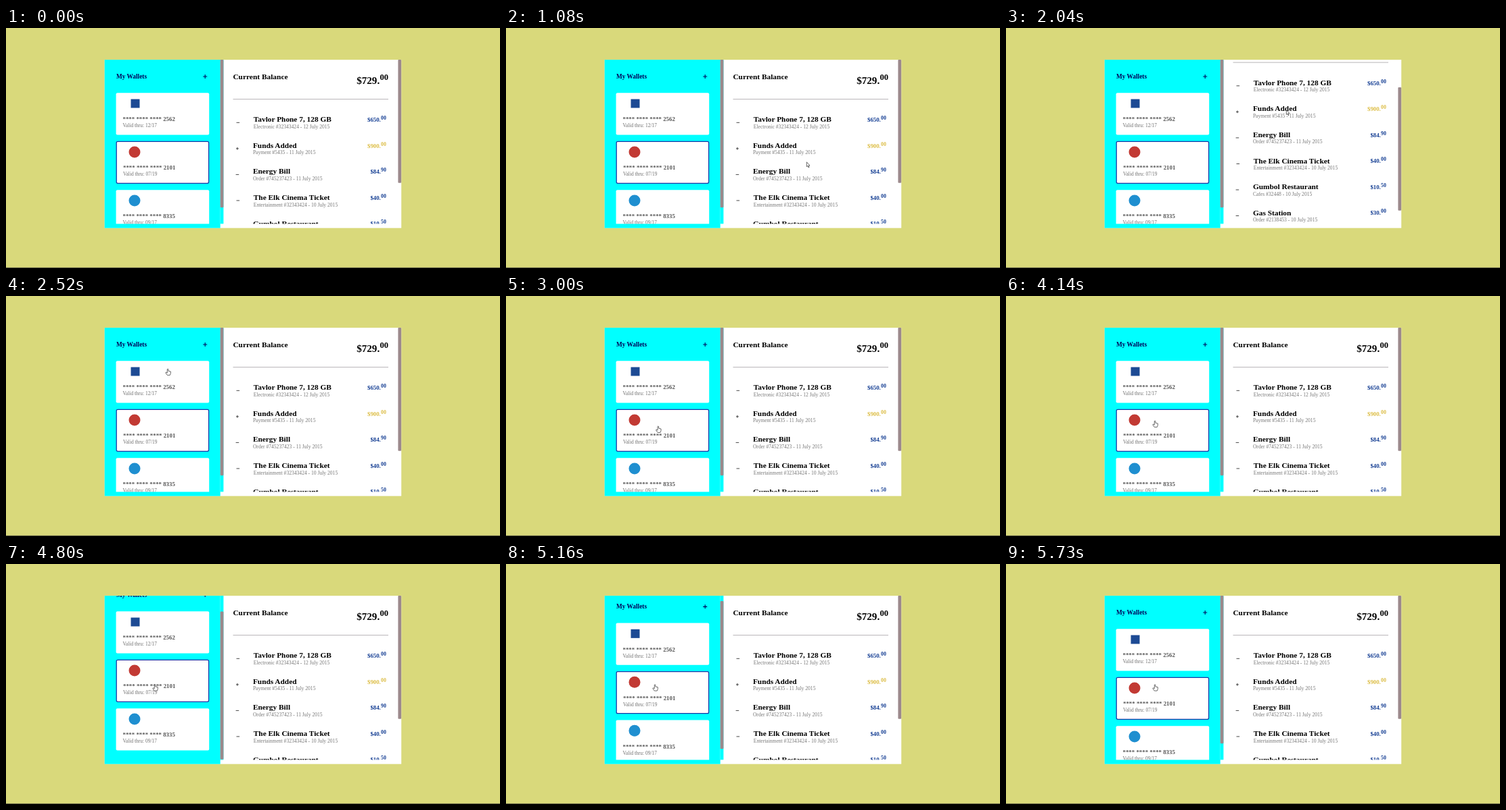
Recreate the animation shown at these times as an HTML page. Size 730 px wide and 356 px high, loop 5760 ms.

```html
<!DOCTYPE html>
<html lang="en">
<head>
<meta charset="utf-8">
<title>Wallet</title>
<style>
  html, body { margin: 0; width: 100%; height: 100%; overflow: hidden; background: #d9d97b; }
  svg { display: block; width: 100vw; height: 100vh; font-family: "Liberation Serif", "Times New Roman", serif; }
  .bold { font-weight: bold; }
  .end { text-anchor: end; }
</style>
</head>
<body>
<svg viewBox="0 0 730 356">
  <clipPath id="leftView"><rect x="145.7" y="47.1" width="171" height="243.3"/></clipPath>
  <clipPath id="rightView"><rect x="321.4" y="47.1" width="258" height="243.3"/></clipPath>
  <rect width="730" height="356" fill="#d9d97b"/>
  <rect y="355" width="730" height="1" fill="#74744e"/>
  <rect x="145.7" y="47.1" width="438.5" height="249.6" fill="#fff"/>
  <rect x="145.7" y="47.1" width="171" height="249.6" fill="#0ff"/>
  <rect x="316.7" y="47.1" width="4.7" height="243.3" fill="#0ff"/>
  <g clip-path="url(#leftView)"><g id="wallets"></g></g>
  <g clip-path="url(#rightView)"><g id="balance"></g></g>
  <rect id="leftThumb" x="316.7" y="47.1" width="4.7" height="219.2" rx="1" fill="#9c898c"/>
  <rect id="rightThumb" x="579.4" y="47.1" width="4.7" height="182.7" rx="1" fill="#9c898c"/>
  <g id="cursor" fill="#fff" stroke="#444" stroke-width=".8" stroke-linejoin="round">
    <path id="arrow" d="M0 0V7L1.6 5.6L2.7 8.2L3.8 7.7L2.7 5.2H4.7Z"/>
    <path id="hand" d="M0 .8Q.8 -.4 1.6 .8V3.4L5 4.2V7L4 9.6H0L-2.4 6.2Q-2.4 5 -1.2 5.4L0 6.4Z"/>
  </g>
</svg>
<script>
const LOOP = 5760, STEP = 30;
const $ = id => document.getElementById(id);

const text = (x, y, size, fill, content, cls = '') =>
  `<text x="${x}" y="${y}" font-size="${size}" fill="${fill}" class="${cls}">${content}</text>`;

const price = (x, y, size, supSize, rise, fill, [whole, cents]) =>
  text(x, y, size, fill, `$${whole}.`, 'bold end') +
  text(x + .3, y - rise, supSize, fill, cents, 'bold');

const sign = (x, y, r, plus, fill, width) =>
  `<path d="M${x - r} ${y}h${2 * r}${plus ? `M${x} ${y - r}v${2 * r}` : ''}" stroke="${fill}" stroke-width="${width}"/>`;

const cards = [
  { digits: '2562', thru: '12/17', mark: '<rect x="184.5" y="105.5" width="13" height="13" fill="#1d4a94"/>' },
  { digits: '2101', thru: '07/19', mark: '<circle cx="190" cy="112" r="8.5" fill="#c23a34"/>', active: true },
  { digits: '8335', thru: '09/17', mark: '<circle cx="190" cy="112" r="8.5" fill="#1f8fd0"/>' },
];

const rows = [
  ['Tavlor Phone 7, 128 GB', 'Electronic #32343424 - 12 July 2015', '650.00'],
  ['Funds Added', 'Payment #5435 - 11 July 2015', '900.00'],
  ['Energy Bill', 'Order #745237423 - 11 July 2015', '84.90'],
  ['The Elk Cinema Ticket', 'Entertainment #32343424 - 10 July 2015', '40.00'],
  ['Gumbol Restaurant', 'Cafes #32448 - 10 July 2015', '10.50'],
  ['Gas Station', 'Order #2138453 - 10 July 2015', '30.00'],
];

$('wallets').innerHTML =
  text(163, 74.6, 9.3, '#000058', 'My Wallets', 'bold') +
  sign(294.2, 72, 3, true, '#000058', 1.1) +
  cards.map(({ digits, thru, mark, active }, i) => {
    const x = active ? 173 : 172.5;
    const frame = active
      ? '<rect x="163.2" y="96.3" width="136.4" height="62" rx="2" fill="#fff" stroke="#1736a6" stroke-width="1.3"/>'
      : '<rect x="162.6" y="96.2" width="137.6" height="62.2" rx="2" fill="#fff"/>';
    return `<g transform="translate(0 ${i * 72})">${frame}${mark}` +
      text(x, 138.2, 8.85, '#555', `**** **** **** ${digits}`, 'bold') +
      text(x, 147.3, 7.45, '#707070', `Valid thru: ${thru}`) + '</g>';
  }).join('');

$('balance').innerHTML =
  text(335.4, 76.3, 11.4, '#000', 'Current Balance', 'bold') +
  price(552.2, 82.5, 15.1, 12.5, 5.8, '#000', ['729', '00']) +
  '<path d="M335.5 105.6H565" stroke="#b8b4b8"/>' +
  rows.map(([title, detail, amount], i) => {
    const income = i === 1;
    const x = i === 0 || i === 3 ? 365.8 : 364.9;
    return `<g transform="translate(0 ${i * 38.55})">` +
      sign(x - 23, 140.3, income ? 1.9 : 2.3, income, '#333', .9) +
      text(x, 139.4, 11.35, '#000', title, 'bold') +
      text(x, 148.9, 7.58, '#777', detail) +
      price(553.8, 139.1, 8.8, 7.8, 3, income ? '#dcbd45' : '#123c92', amount.split('.')) + '</g>';
  }).join('');

// Keys are [time, ...values], interpolated linearly.
const cursorKeys = [
  [30, 728, 322], [480, 470, 224], [690, 470, 224], [780, 444.3, 198.8],
  [1500, 444.3, 198.8], [1650, 414.3, 121.5], [2190, 414.3, 121.5],
  [2520, 238.3, 107.8], [2580, 238.3, 107.8], [3060, 222, 205],
  [3210, 222, 205], [3330, 219.2, 239], [3630, 219.2, 239], [4200, 219.3, 178.5],
];
const rightScrollKeys = [[1590, 0], [1830, 80], [1980, 80], [2040, 54.5], [2190, 0]];
const leftScrollKeys = [[4650, 0], [4800, 26], [4980, 26], [5250, 0]];

function sample(keys, t) {
  const next = keys.findIndex(k => k[0] > t);
  if (next === 0) return keys[0].slice(1);
  if (next < 0) return keys[keys.length - 1].slice(1);
  const a = keys[next - 1], b = keys[next];
  const p = (t - a[0]) / (b[0] - a[0]);
  return a.slice(1).map((v, i) => v + (b[i + 1] - v) * p);
}

const move = (id, x, y) => $(id).setAttribute('transform', `translate(${x} ${y})`);

function draw(t) {
  const [left] = sample(leftScrollKeys, t);
  const [right] = sample(rightScrollKeys, t);
  move('wallets', 0, -left);
  move('leftThumb', 0, left * 243 / 269);
  move('balance', 0, -right);
  move('rightThumb', 0, right * .751);

  const [x, y] = sample(cursorKeys, t);
  const overCard = x > 163 && x < 300 && cards.some((_, i) => {
    const top = 96.5 + 72 * i - left;
    return y > top && y < top + 62;
  });
  move('cursor', x, y);
  $('cursor').style.display = t < STEP ? 'none' : '';
  $('arrow').style.display = overCard ? 'none' : '';
  $('hand').style.display = overCard ? '' : 'none';
}

const start = performance.now();
function tick() {
  const t = (performance.now() - start) % LOOP;
  draw(Math.floor(t / STEP) * STEP);
  requestAnimationFrame(tick);
}
tick();
</script>
</body>
</html>
```
